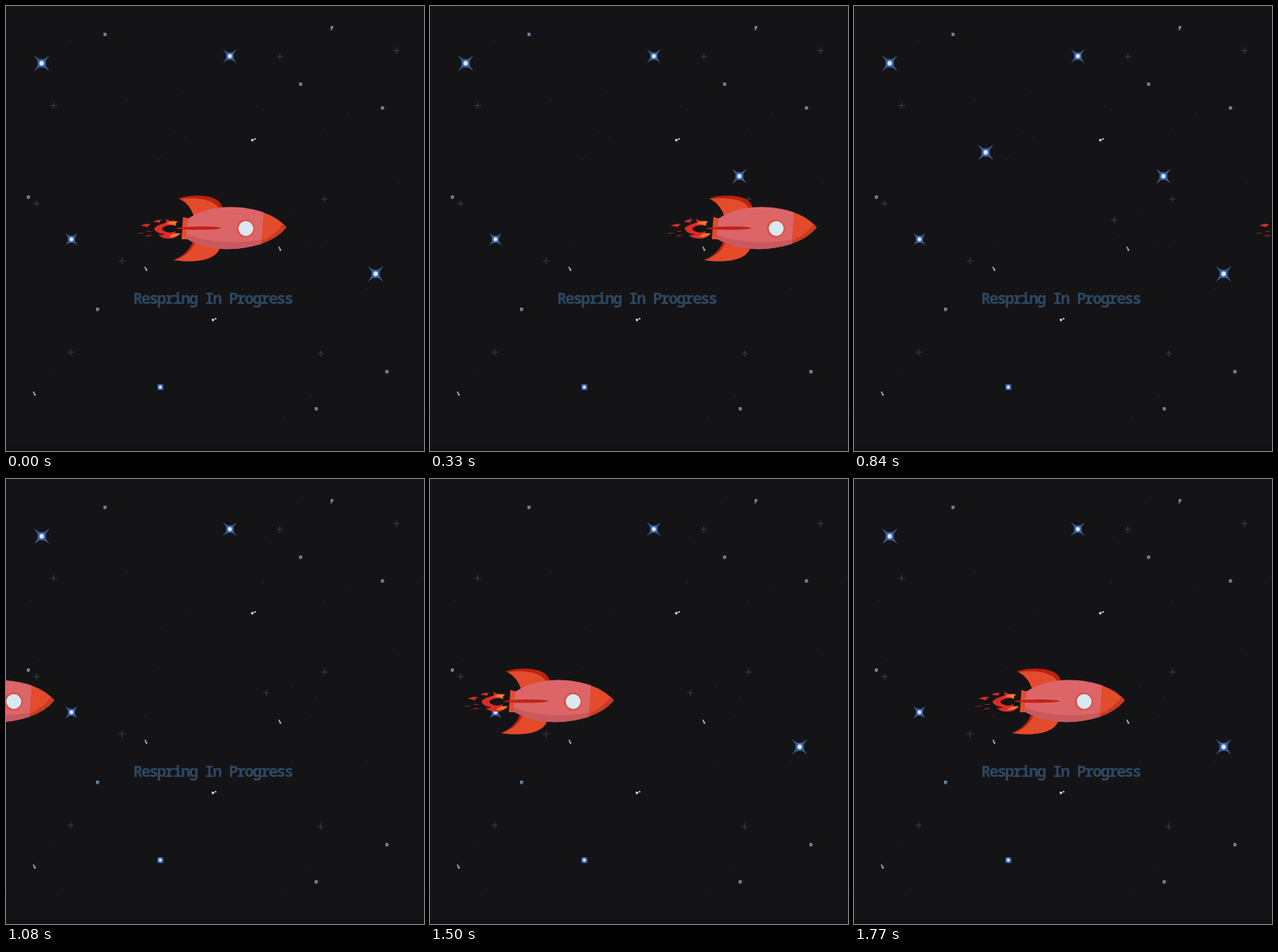
An HTML page for the animation above (1800 ms loop, 562x599 px).

```html
<!DOCTYPE html>
<html lang="en">
<head>
<meta charset="utf-8">
<title>Respring In Progress</title>
<style>
  html, body { margin: 0; width: 100%; height: 100%; overflow: hidden; background: #141416; }
  svg { display: block; width: 562px; height: 599px; }
  text { font: 600 21px "Noto Sans Mono", "DejaVu Sans Mono", monospace; letter-spacing: -1.9px; fill: #2e4861; white-space: pre; }
</style>
</head>
<body>
<svg viewBox="0 0 562 599">
  <rect width="562" height="599" fill="#141416"/>
  <rect y="594" width="562" height="5" fill="#101012"/>
  <g id="sky"></g>
  <g id="stars"></g>
  <text id="label" x="171" y="401"></text>
  <g id="rocket">
    <!-- flames -->
    <g fill="#dc2d25">
      <path d="M199 300C203 294 210 294 216 291Q216 288 214 286Q219 290 231 290Q226 294 229 296Q219 293 211 298Q208 301 213 303Q219 307 228 303Q225 307 233 308Q227 314 218 313Q209 313 205 308Q211 309 213 307Q203 307 199 300Z"/>
      <path d="M198 291Q202 287 210 288Q206 289 207 292Q202 290 198 291ZM181 296Q186 292 195 294Q191 295 190 298Q187 296 181 296Z"/>
      <path d="M175 307Q180 304 186 306Q180 306 175 307ZM188 304Q191 302 197 304Q192 304 188 304ZM187 310Q191 307 197 309Q192 310 187 310Z" opacity=".8"/>
    </g>
    <path d="M216 293Q222 288 231 290Q226 293 229 296Q223 293 216 293ZM219 311Q224 305 235 306Q230 311 219 311Z" fill="#ee7938"/>
    <!-- upper and lower fins -->
    <path d="M232 259C249 253 288 252 291 272L253 284Q248 267 232 259Z" fill="#bd2111"/>
    <path d="M235 260C252 257 279 259 286 272L253 284Q248 267 235 260Z" fill="#e34b2b"/>
    <path d="M225 342Q245 334 251 317L287 326C281 343 251 346 225 342Z" fill="#bd2111"/>
    <path d="M227 342Q247 335 254 319L287 327C281 343 252 346 227 342Z" fill="#e34b2b"/>
    <!-- hull -->
    <path d="M238 284L246 286L243 314L236 314Z" fill="#e34b2b"/>
    <path d="M245 286C274 267 315 267 347 278L344 320C310 331 273 330 242 313Z" fill="#dc6568"/>
    <path d="M243 308C276 319 313 321 345 314L344 320C310 331 273 330 242 313Z" fill="#c9595d"/>
    <path d="M346.500 278Q366 285 377 298Q366 312 343.500 320Z" fill="#e34b2b"/>
    <path d="M377 298Q366 312 343.500 320L344 316Q363 308 373 293Z" fill="#c63c22"/>
    <path d="M228 299.500C241 296 283 296 290 299C282 302 242 302 228 299.500Z" fill="#c02317"/>
    <circle cx="322" cy="299.500" r="12" fill="#dd4f3e"/>
    <circle cx="322.500" cy="299.500" r="10" fill="#d7e9f3"/>
  </g>
</svg>
<script>
const W = 562, H = 599;
const LOOP = 1800, STEP = 30, SPEED = 13, WRAP = 390;
const $ = id => document.getElementById(id);
const clamp = (v, lo, hi) => Math.min(hi, Math.max(lo, v));

function add(parent, tag, attrs) {
  const el = document.createElementNS("http://www.w3.org/2000/svg", tag);
  for (const key in attrs) el.setAttribute(key, attrs[key]);
  return parent.appendChild(el);
}

// One path holding the same small mark at every point.
function scatter(points, mark, fill) {
  add($("sky"), "path", { d: points.map(([x, y]) => `M${x} ${y}${mark}`).join(""), fill });
}

let seed = 7;
function random() {
  seed = seed * 16807 % 2147483647;
  return seed / 2147483647;
}

const specks = Array.from({ length: 55 }, () => [random() * W, random() * H]);
scatter(specks, "m-.6-.6h1.200v1.200h-1.200z", "#29292c");
scatter([[64,134],[41,266],[156,343],[87,466],[368,68],[525,60],[428,260],[350,288],[423,468]],
  "m-.7-4.500h1.400l.4 3.400 3.400.4v1.400l-3.400.4-.4 3.400h-1.400l-.4-3.400-3.400-.4v-1.400l3.400-.4z", "#2f2f32");
scatter([[133,38],[396,105],[506,137],[30,257],[123,408],[512,492],[417,542]],
  "m-2-2h4l.5 3-1 1.500h-3.500z", "#66809f");
scatter([[438,30]], "m-1.500-3h3.500v3.500h-2v2.500h-1.500z", "#85878b");
scatter([[333,180],[280,422]], "m-3.500-1h3l.5 2-1 1.200h-2zm4.200-1h2v2h-2z", "#d8d8d8");
scatter([[188,354],[368,327],[38,522]], "m-2-3h2l.5 2.500 1.500.5v2.500h-2l-1-3z", "#a5a8ad");

// Each star is lit for `span` ms after `from`; the flash lights them all.
const FLASH = { from: 720, span: 300 };
const stars = [
  { x: 48, y: 77, ray: 11, from: 1590, span: 1350 },
  { x: 301, y: 67.5, ray: 9.5, from: 0, span: LOOP },
  { x: 416, y: 229, ray: 10.5, from: 180, span: 270 },
  { x: 88, y: 314, ray: 8.5, from: 1380, span: 1560 },
  { x: 497, y: 360.5, ray: 11, from: 1410, span: 570 },
  { x: 207.5, y: 513, ray: 0, from: 0, span: LOOP },
  { x: 177, y: 197, ray: 11, from: 0, span: 0 }
];
const isLit = ({ from, span }, t) => (t - from + LOOP) % LOOP < span;

for (const star of stars) {
  const { x, y, ray } = star;
  const core = ray ? 2.2 + ray * .3 : 4;
  star.el = add($("stars"), "g", { transform: `translate(${x} ${y})` });
  for (const angle of [45, 135, 225, 315]) {
    add(star.el, "path", {
      d: `M0-2L${ray * 1.35} 0L0 2Z`, transform: `rotate(${angle})`, fill: "#416fa8"
    });
  }
  add(star.el, "rect", { x: -core, y: -core, width: 2 * core, height: 2 * core, rx: core * .4, fill: "#3764ac" });
  add(star.el, "ellipse", { rx: core * .54, ry: core * .58, fill: "#e3e3e1" });
}

// Words leave one by one from the end, then return faster.
const WORDS = ["Respring", "In", "Progress"];
function wordCount(t) {
  const gone = clamp(Math.floor((t - 1140) / 90), 0, 3);
  const back = clamp(Math.floor((t - 1530) / 60), 0, 3);
  return 3 - gone + back;
}

function draw(time) {
  const t = Math.floor(time % LOOP / STEP) * STEP;
  const x = (t / STEP * SPEED + WRAP) % (2 * WRAP) - WRAP;
  $("rocket").setAttribute("transform", `translate(${x} 0)`);
  for (const star of stars) {
    const on = isLit(star, t) || isLit(FLASH, t);
    star.el.setAttribute("visibility", on ? "visible" : "hidden");
  }
  $("label").textContent = WORDS.slice(0, wordCount(t)).join(" ");
}

const start = performance.now();
function tick() {
  draw(performance.now() - start);
  requestAnimationFrame(tick);
}
tick();
</script>
</body>
</html>
```
